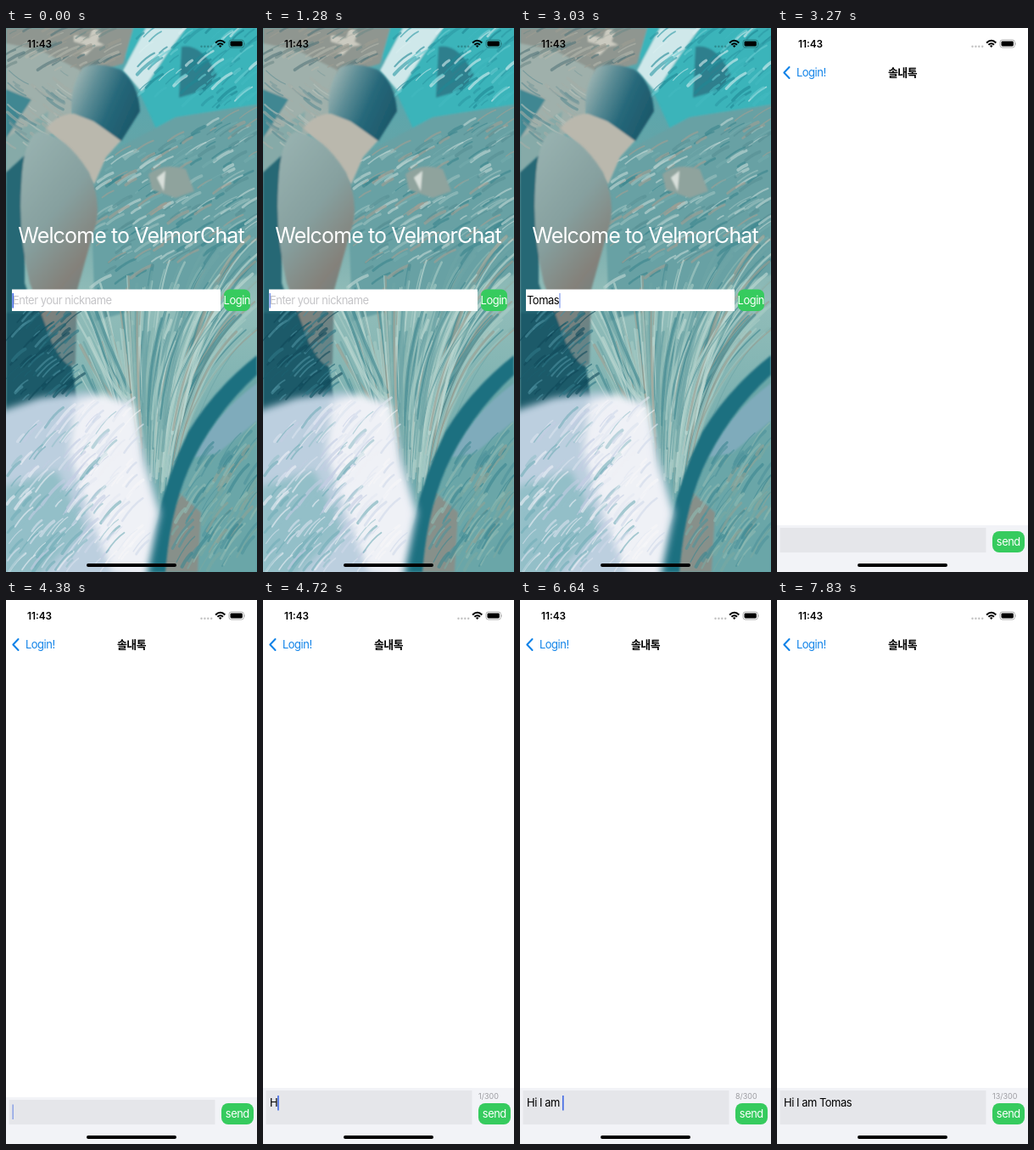
These frames come from a looping animation (296 by 640 pixels, 8 s). An HTML page:

```html
<!DOCTYPE html>
<html lang="en">
<head>
<meta charset="utf-8">
<title>Chat login</title>
<style>
html, body { margin: 0; width: 100%; height: 100%; overflow: hidden; background: #fff; }
svg { display: block; width: 296px; height: 640px; }
text { font: 12.9px Inter, Roboto, sans-serif; letter-spacing: -.035em; white-space: pre; }
#title { font-size: 25px; letter-spacing: -.035em; }
#room { font: 600 12.9px "Noto Sans CJK KR", "Noto Sans CJK", sans-serif; }
#clock { font-size: 11.8px; font-weight: 600; letter-spacing: 0; }
#count { font-size: 9px; letter-spacing: 0; }
.mid { text-anchor: middle; }
</style>
</head>
<body>
<svg viewBox="0 0 296 640">
  <defs>
    <linearGradient id="river" x1="0" y1="0" x2="0" y2="1">
      <stop offset="0" stop-color="#4fa9b1"/>
      <stop offset=".3" stop-color="#6ba3a5"/>
      <stop offset=".5" stop-color="#92bdb9"/>
      <stop offset="1" stop-color="#5b9fa4"/>
    </linearGradient>
    <linearGradient id="boulder" x1="0" y1="0" x2=".4" y2="1">
      <stop offset="0" stop-color="#9ab4b2"/>
      <stop offset=".45" stop-color="#86a09f"/>
      <stop offset=".75" stop-color="#84817a"/>
      <stop offset="1" stop-color="#668487"/>
    </linearGradient>
    <linearGradient id="dark" x1="0" y1=".2" x2="1" y2=".7">
      <stop offset="0" stop-color="#a3b8b5"/>
      <stop offset=".3" stop-color="#5d8d96"/>
      <stop offset=".6" stop-color="#26687a"/>
      <stop offset="1" stop-color="#1b5668"/>
    </linearGradient>
    <filter id="soft" x="-10%" y="-10%" width="120%" height="120%"><feGaussianBlur stdDeviation="1"/></filter>
    <filter id="fine" x="-10%" y="-10%" width="120%" height="120%"><feGaussianBlur stdDeviation=".5"/></filter>
    <filter id="mist" x="-20%" y="-20%" width="140%" height="140%"><feGaussianBlur stdDeviation="4"/></filter>
  </defs>

  <g id="login">
    <rect width="296" height="640" fill="url(#river)"/>
    <g filter="url(#soft)">
      <path d="M130 0H296V98L180 125 150 60Z" fill="#3bb4ba"/>
      <path d="M138 50 165 0H212L190 30 160 75Z" fill="#cfe8ea"/>
      <path d="M0 0H150L138 42 80 60 0 30Z" fill="#8f9690"/>
      <path d="M80 8 98 12 102 0 112 4 108 16 116 20 104 22 94 32 84 28 94 20 80 16Z" fill="#cbcac0"/>
      <path d="M0 18 40 26 88 50 76 110 30 140 0 150Z" fill="#9fb0ab"/>
      <path d="M0 72 30 84 0 130Z" fill="#3f8792"/>
      <path d="M0 130 50 98 45 130 0 185Z" fill="#86aaa8"/>
      <path d="M204 82 207 22Q232 18 249 56L238 72Z" fill="#2d7f8d"/>
      <path d="M125 145 200 105 296 90V290L105 345 100 190Z" fill="#68a1a4"/>
    </g>
    <g id="rapids" fill="none" filter="url(#fine)"></g>
    <g filter="url(#soft)">
      <path d="M168 172Q185 158 212 166L222 192 200 200 172 190Z" fill="#8fa39d"/>
      <path d="M178 176 188 168 186 192Z" fill="#d8dfda"/>
      <path d="M48 118Q62 98 90 101L136 132 118 152 104 184 70 140Z" fill="#bab8ad"/>
      <path d="M78 100Q74 70 90 47Q105 38 135 49Q156 65 158 98L136 133 104 110Z" fill="url(#dark)"/>
    </g>
    <g id="fall" fill="none" filter="url(#fine)"></g>
    <g filter="url(#soft)">
      <path d="M296 405Q240 450 215 500T188 640H296Z" fill="#6aa6a8"/>
      <path d="M296 418Q245 455 222 505L250 500 296 462Z" fill="#7fabbb"/>
      <path d="M186 640Q186 570 202 545L230 570 226 640Z" fill="#87908a"/>
    </g>
    <g id="slope" fill="none" filter="url(#fine)"></g>
    <g filter="url(#soft)">
      <path d="M296 385Q245 425 215 475Q190 525 178 580L156 640H188Q194 560 222 505Q250 450 296 408Z" fill="#1f7080"/>
      <path d="M0 322 50 330 78 400 84 440 40 445 0 470Z" fill="#1b5a69"/>
      <path d="M0 170 22 150 22 300 34 335 0 335Z" fill="#276875"/>
      <path d="M18 185Q20 130 38 122Q70 125 98 170Q115 210 103 240L84 308 82 395Q72 405 54 370L28 300Q14 240 18 185Z" fill="url(#boulder)"/>
    </g>
    <g filter="url(#mist)">
      <path d="M-10 452 40 435 95 428 150 440 165 510 182 570 165 650H-10Z" fill="#bccfdf"/>
      <path d="M82 440 115 430 152 446 160 510 178 570 165 645 125 640 95 560 75 500Z" fill="#eff1f6"/>
      <path d="M-5 540 60 520 95 590 40 645H-5Z" fill="#93bfc8"/>
    </g>
    <g id="foam" fill="none" filter="url(#fine)"></g>
    <text id="title" class="mid" x="147.5" y="253" fill="#fff">Welcome to VelmorChat</text>
    <rect x="7" y="307.5" width="246" height="25.5" fill="#fff"/>
    <text id="hint" x="8" y="325" fill="#c4c4c7">Enter your nickname</text>
    <text id="nick" x="8" y="325"></text>
    <rect x="257" y="307.5" width="31" height="25.5" rx="7" fill="#36cb5e"/>
    <text class="mid" x="272.3" y="325" fill="#fff">Login</text>
  </g>

  <g id="chat">
    <rect width="296" height="640" fill="#fff"/>
    <path d="M14.5 46 8.3 52.5 14.5 59" fill="none" stroke="#0f82e8" stroke-width="2" stroke-linecap="round" stroke-linejoin="round"/>
    <text x="23" y="57" fill="#0f82e8">Login!</text>
    <text id="room" class="mid" x="148" y="57">솔내톡</text>
    <rect id="panel" width="296" fill="#f2f3f7"/>
    <rect id="field" x="3.5" width="243" fill="#e5e6ea"/>
    <text id="msg" x="8" y="596"></text>
    <text id="count" x="254" y="586.5" fill="#9c9ca1"></text>
    <rect x="254" y="592" width="38" height="25" rx="8" fill="#36cb5e"/>
    <text class="mid" x="272.8" y="609" fill="#fff">send</text>
  </g>

  <rect id="caret" width="1.6" fill="#3f68e4"/>

  <text id="clock" x="25" y="23">11:43</text>
  <g opacity=".24">
    <circle cx="230.5" cy="21.7" r="1.2"/><circle cx="234.4" cy="21.7" r="1.2"/>
    <circle cx="238.3" cy="21.7" r="1.2"/><circle cx="242.2" cy="21.7" r="1.2"/>
  </g>
  <g fill="none" stroke="#000" stroke-width="2">
    <path d="M247.1 17.4Q252.7 12.1 258.3 17.4M249.4 19.8Q252.7 16.7 256 19.8"/>
    <path d="M250.9 21.1Q252.7 19.6 254.5 21.1L252.7 23Z" fill="#000" stroke="none"/>
  </g>
  <g opacity=".35">
    <rect x="263" y="14" width="17.4" height="9" rx="2.7" fill="none" stroke="#000" stroke-width=".9"/>
    <path d="M281.3 17V20.2Q282.6 18.6 281.3 17Z"/>
  </g>
  <rect x="264.5" y="15.5" width="14.4" height="6" rx="1.4"/>
  <rect x="95" y="630" width="106" height="4" rx="2"/>
</svg>
<script>
const LOOP = 8000, CHAT_AT = 3270;
const NAME = "Tomas", MESSAGE = "Hi I am " + NAME;
const $ = id => document.getElementById(id);

// Stepped tracks: [time, value]
const nickTrack = [[0, 0], [1700, 1], [1840, 3], [1980, 5]];
const msgTrack = [[0, 0], [4720, 1], [4880, 2], [5000, 3], [5410, 4], [5580, 5], [5970, 6],
  [6110, 7], [6640, 8], [6790, 9], [6905, 10], [7025, 11], [7140, 13]];
const caretTrack = [[0, 1], [260, .5], [380, 0], [620, .5], [740, 1], [1280, .7], [1400, 0],
  [1700, 1], [2560, .5], [2680, 0], [2910, .25], [3030, .5], [CHAT_AT, 0],
  [4380, .5], [4500, 1], [7710, .5], [7830, 0]];

function at(track, t) {
  let value = track[0][1];
  for (const [time, v] of track) if (t >= time) value = v;
  return value;
}

function set(el, attrs) {
  for (const k in attrs) el.setAttribute(k, attrs[k]);
}

let seed = 7;
const rand = (a, b) => {
  seed = (seed * 16807) % 2147483647;
  return a + (b - a) * seed / 2147483647;
};
const pick = list => list[Math.floor(rand(0, list.length))];

function stroke(group, d, colors, opacity) {
  const p = document.createElementNS("http://www.w3.org/2000/svg", "path");
  set(p, { d, stroke: pick(colors), "stroke-width": rand(1, 4), opacity, "stroke-linecap": "round" });
  $(group).append(p);
}

// Curved dabs inside a box; tilt drops its lower right side
function dabs(group, n, [x0, y0, x1, y1], rise, colors, tilt = 0) {
  for (let i = 0; i < n; i++) {
    const x = rand(x0, x1), y = rand(y0, y1) - (x - x0) * tilt, len = rand(6, 26);
    stroke(group, `M${x} ${y}q${len * .5} ${-len * rise * .7} ${len} ${-len * rise}`, colors, .6);
  }
}

function paintWater() {
  dabs("rapids", 60, [0, 0, 120, 50], .5, ["#6f8a89", "#b3b5ab", "#55777c", "#9c9d93"]);
  dabs("rapids", 50, [0, 50, 70, 135], -.7, ["#b9c3bc", "#7b9b9c", "#a5aea6", "#5e8c93"]);
  dabs("rapids", 80, [150, 5, 290, 95], .8, ["#2b98a3", "#69cbd0", "#d9eff0", "#1f8795", "#43b9c0"]);
  dabs("rapids", 220, [100, 155, 290, 310], .6, ["#9cc2c0", "#3b858e", "#a39f92", "#75abad", "#c3d9d6", "#568f94"], .3);

  const fall = ["#bcd8d2", "#a5c9c4", "#6da5a6", "#468b92", "#9a9f92", "#8ab7b3"];
  for (let i = 0; i < 200; i++) {
    const u = rand(0, 1), x = 80 + 225 * u, y = 330 - 65 * u + rand(-25, 90);
    stroke("fall", `M${x} ${y}Q${115 + 110 * u} ${y + 60} ${140 + 60 * u} ${470 + 50 * u + rand(-50, 60)}`, fall, .65);
  }
  dabs("slope", 110, [195, 500, 290, 640], 1.4, ["#8fbab3", "#4f939b", "#7aa9a2", "#92a294", "#3c8791"]);
  dabs("foam", 70, [0, 335, 72, 440], .9, ["#11495a", "#2f7786", "#4d91a0", "#1d6070"]);
  dabs("foam", 150, [0, 465, 120, 640], 1.1, ["#eef0f6", "#c3cde3", "#94c0ca", "#dbe2ee", "#72adb8"]);
  dabs("foam", 60, [75, 445, 155, 640], 1.1, ["#f6f7f9", "#e3e8f1", "#cfd9ea"]);
}

function draw(t) {
  const chat = t >= CHAT_AT;
  $("login").style.display = chat ? "none" : "";
  $("chat").style.display = chat ? "" : "none";

  const typed = at(nickTrack, t), n = at(msgTrack, t);
  $("nick").textContent = NAME.slice(0, typed);
  $("hint").style.display = typed ? "none" : "";
  $("msg").textContent = MESSAGE.slice(0, n);
  $("count").textContent = n ? n + "/300" : "";

  const top = n ? 574 : 585;
  set($("panel"), { y: top, height: 640 - top });
  set($("field"), { y: top + 3, height: 614 - top });

  const line = chat ? $("msg") : $("nick");
  const width = line.textContent ? line.getComputedTextLength() : -.6;
  const y = !chat ? 312 : n ? 583 : 593.5;
  set($("caret"), { x: 8 + width, y, height: 17.5, opacity: at(caretTrack, t) });
}

paintWater();
const start = performance.now();
function tick() {
  draw((performance.now() - start) % LOOP);
  requestAnimationFrame(tick);
}
tick();
</script>
</body>
</html>
```
